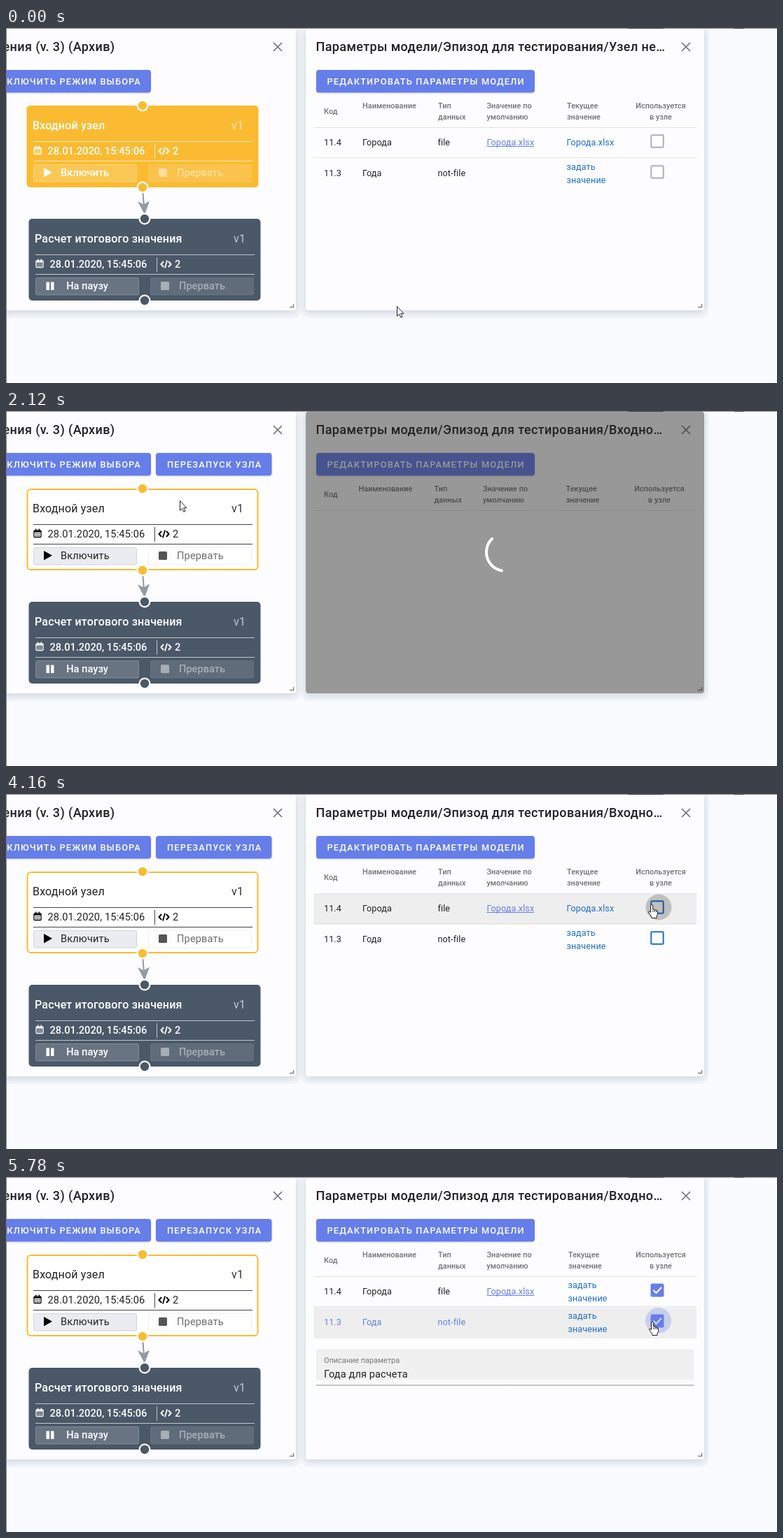
Animation, 1101 px wide and 508 px high, one loop 6.84 s. Source, as an HTML page with a canvas:

```html
<!DOCTYPE html>
<html lang="ru">
<head>
<meta charset="utf-8">
<title>Параметры модели</title>
<style>
html, body { margin: 0; width: 100%; height: 100%; overflow: hidden; background: #fafbfe; }
canvas { display: block; }
</style>
</head>
<body>
<canvas id="stage" width="1101" height="508"></canvas>
<script>
const ctx = document.getElementById('stage').getContext('2d');
const LOOP = 6840;
const ACCENT = '#667eea', LINK = '#1f6fc6', INK = '#222', YELLOW = '#fabb32', SLATE = '#4a5868', PANEL = '#fdfdff';

// The screen refreshes in bursts: [start, end, steps]
const BURSTS = [[620, 1200, 5], [1820, 2850, 8], [3000, 4030, 8], [4160, 5190, 8], [5480, 5780, 3]];
const STOPS = [0];
for (const [start, end, steps] of BURSTS)
  for (let i = 0; i < steps; i++)
    STOPS.push(Math.floor((start + (end - start) * i / (steps - 1)) / 10) * 10);

// Pointer: time, x, y, hand?
const POINTER = [
  [0, 558, 398], [620, 538, 376], [760, 462, 306], [900, 350, 210], [1050, 274, 146], [1200, 248, 128],
  [2500, 247, 128], [2800, 280, 143], [3000, 520, 172, 1], [3140, 749, 199, 1], [3280, 838, 190, 1],
  [3420, 886, 175, 1], [3580, 908, 165, 1], [3720, 914, 161, 1], [3860, 916, 159, 1], [4020, 917, 158, 1],
  [4590, 921, 182, 1], [4740, 920, 206, 1], [4880, 926, 208], [5180, 918, 207, 1]
];

function bezier(x1, y1, x2, y2) {
  const at = (a, b, s) => 3 * (1 - s) ** 2 * s * a + 3 * (1 - s) * s * s * b + s ** 3;
  return x => {
    if (x <= 0) return 0;
    if (x >= 1) return 1;
    let lo = 0, hi = 1;
    for (let i = 0; i < 24; i++) {
      const mid = (lo + hi) / 2;
      if (at(x1, x2, mid) < x) lo = mid; else hi = mid;
    }
    return at(y1, y2, lo);
  };
}
const fade = bezier(.25, .8, .5, 1), easeInOut = bezier(.42, 0, .58, 1);

function text(s, x, y, size, color, { weight = 400, spacing = 0, align = 'left' } = {}) {
  ctx.font = `${weight} ${size}px Roboto, sans-serif`;
  ctx.letterSpacing = spacing + 'px';
  ctx.textAlign = align;
  ctx.fillStyle = color;
  ctx.fillText(s, x, y);
}

function box(x, y, w, h, r, fill, stroke, width = 1) {
  ctx.beginPath();
  ctx.roundRect(x, y, w, h, r);
  if (fill) { ctx.fillStyle = fill; ctx.fill(); }
  if (stroke) { ctx.strokeStyle = stroke; ctx.lineWidth = width; ctx.stroke(); }
}

function path(points, { fill, stroke, width = 1, close = false }) {
  ctx.beginPath();
  points.forEach(([x, y]) => ctx.lineTo(x, y));
  if (close) ctx.closePath();
  if (fill) { ctx.fillStyle = fill; ctx.fill(); }
  if (stroke) { ctx.strokeStyle = stroke; ctx.lineWidth = width; ctx.stroke(); }
}
const line = (x1, y1, x2, y2, stroke, width = 1) => path([[x1, y1], [x2, y2]], { stroke, width });

function disc(x, y, r, fill) {
  ctx.beginPath();
  ctx.arc(x, y, r, 0, 7);
  ctx.fillStyle = fill;
  ctx.fill();
}

function panel(x, w) {
  ctx.save();
  ctx.shadowColor = 'rgba(110, 128, 155, .32)';
  ctx.shadowBlur = 11;
  ctx.shadowOffsetY = 2;
  box(x, 1, w, 403, 4, PANEL);
  ctx.restore();
  const right = x + w;
  path([[right - 3.5, 395], [right - 3.5, 399.5], [right - 9, 399.5]], { stroke: '#858585', width: 1.5 });
  const cx = right - 26, cy = 27;
  line(cx - 6, cy - 6, cx + 6, cy + 6, '#757575', 1.7);
  line(cx + 6, cy - 6, cx - 6, cy + 6, '#757575', 1.7);
}

function button(x, w, label, labelX, align) {
  ctx.save();
  ctx.shadowColor = 'rgba(0, 0, 0, .16)';
  ctx.shadowBlur = 3;
  ctx.shadowOffsetY = 1;
  box(x, 60, w, 32.5, 4, ACCENT);
  ctx.restore();
  text(label, labelX, 81, 12.8, '#fff', { weight: 500, spacing: 1.15, align });
}

function calendar(x, y, color) {
  box(x + 1, y + 2, 10, 9.5, 1, null, color, 1.3);
  ctx.fillStyle = color;
  ctx.fillRect(x + 1, y + 3, 10, 1.6);
  ctx.fillRect(x + 3, y - .5, 1.4, 3);
  ctx.fillRect(x + 7.6, y - .5, 1.4, 3);
  for (let i = 0; i < 6; i++) ctx.fillRect(x + 3 + i % 3 * 2.4, y + 6 + (i > 2) * 2.5, 1.3, 1.3);
}

function codeIcon(x, y, color) {
  const style = { stroke: color, width: 2 };
  path([[x + 4.5, y - 4], [x + 1, y], [x + 4.5, y + 4]], style);
  path([[x + 11.5, y - 4], [x + 15, y], [x + 11.5, y + 4]], style);
  line(x + 9.6, y - 5.5, x + 6.4, y + 5.5, color, 1.8);
}

function node(dx, dy, { title, action, paused, base, selected }) {
  const ink = selected ? '#222' : '#fff', icon = selected ? '#000' : '#fff';
  const weight = selected ? 400 : 500, spacing = selected ? .14 : 0;
  const rule = selected ? '#444' : 'rgba(255, 255, 255, .65)';
  const weak = selected ? '#6d6d6d' : 'rgba(255, 255, 255, .45)';
  ctx.save();
  ctx.translate(dx, dy);
  if (selected) box(30.5, 112, 329, 115, 5, '#fff', YELLOW, 2);
  else box(29.5, 111, 331, 117, 5, base);
  text(title, 38, 145, 16, ink, { weight, spacing: .16 });
  text('v1', 322, 145, 16, selected ? '#333' : 'rgba(255, 255, 255, .68)', { spacing: .15 });
  line(39, 162.5, 352, 162.5, rule);
  line(39, 190.5, 352, 190.5, rule);
  line(212.5, 166, 212.5, 187, rule);
  calendar(39, 169, icon);
  text('28.01.2020, 15:45:06', 59.5, 181, 14.6, ink, { weight, spacing });
  codeIcon(217.5, 176, icon);
  text('2', 238, 181, 14.6, ink, { weight });
  box(39.5, 195.5, 147, 24.5, 2, selected ? '#ebecf1' : 'rgba(255, 255, 255, .17)', selected ? '#d2d3da' : 'rgba(255, 255, 255, .25)');
  box(203.5, 195.5, 147, 24.5, 2, selected ? '#fefefe' : 'rgba(255, 255, 255, .12)', selected ? '#f0f0f2' : 'rgba(255, 255, 255, .1)');
  ctx.fillStyle = icon;
  if (paused) {
    ctx.fillRect(54.5, 201.5, 4.5, 11.5);
    ctx.fillRect(61, 201.5, 4.5, 11.5);
  } else path([[54, 200], [66, 206.7], [54, 213.4]], { fill: icon, close: true });
  text(action, paused ? 83.2 : 78, 212.3, 14.6, ink, { weight, spacing });
  box(218, 201, 12, 12, 1.5, selected ? '#555' : weak);
  text('Прервать', 244, 212.3, 14.6, weak, { weight, spacing });
  ctx.restore();
}

function port(x, y, color) {
  disc(x, y, 8.5, '#fff');
  disc(x, y, 6.2, color);
}

function checkbox(y, on, color) {
  if (!on) return box(921.3, y - 8.7, 17.4, 17.4, 1.5, null, color, 2);
  box(920.5, y - 9.5, 19, 19, 2.5, ACCENT);
  path([[924.5, y], [928.5, y + 4], [936, y - 4]], { stroke: '#fff', width: 2.2 });
}

function tableHead(loading, valueX) {
  const style = { weight: 500 }, shift = loading ? -5.5 : 0;
  const cell = (lines, x, y, opts = style) => lines.forEach((s, i) => text(s, x, y + i * 16.4, 10.9, '#727272', opts));
  cell(['Код'], 454, 123);
  cell(['Наименование'], 509 + shift, 115);
  cell(['Тип', 'данных'], 617 + shift, 115);
  cell(['Значение по', 'умолчанию'], 686.5 + shift, 115);
  cell(['Текущее', 'значение'], valueX, 115);
  cell(['Используется', 'в узле'], loading ? 933 : 935, 115, { weight: 500, align: 'center' });
  line(440, 142.5, 986, 142.5, '#e2e2e4');
}

function row(y, { code, name, type, file, value, valueX, hover, selected, checked, boxColor }) {
  if (hover || selected) {
    ctx.fillStyle = hover ? '#eeeeee' : '#eef0fc';
    ctx.fillRect(439.5, y - 21, 546.5, 44.5);
  }
  const color = selected ? ACCENT : INK, base = y + 4.5;
  const cell = (s, x, dy, ink) => text(s, x, base + dy, 12.6, ink, { spacing: .1 });
  cell(code, 454, 0, color);
  cell(name, 509, 0, color);
  cell(type, 616.5, 0, color);
  if (file) {
    cell(file, 686.5, 0, ACCENT);
    line(686.5, base + 1.5, 686.5 + ctx.measureText(file).width, base + 1.5, ACCENT);
  }
  if (value) cell(value, valueX - .5, 0, LINK);
  else {
    cell('задать', valueX - .5, -9.3, LINK);
    cell('значение', valueX - .5, 9.8, LINK);
  }
  checkbox(y - 1.5, checked, boxColor);
}

function description(value, bottom) {
  box(443, 246, 539.5, 52, [4, 4, 0, 0], '#fafafb');
  box(443, 246, 539.5, bottom - 246, [4, 4, 0, 0], '#f0f0f0');
  line(443, 298, 982.5, 298, '#8c8c8c');
  text('Описание параметра', 454, 266, 10.9, '#777');
  text(value, 454, 286.6, 14.5, INK, { spacing: .15 });
}

function spinner(elapsed) {
  const phase = elapsed / 1400 % 1;
  const grow = easeInOut(phase * 2), slide = easeInOut(phase * 2 - 1);
  const from = 15 * grow + 110 * slide;
  const to = Math.min(from + 1 + 99 * grow, 125.6);
  const turn = phase * Math.PI * 2;
  ctx.beginPath();
  ctx.arc(713, 202, 27, turn + from / 20, turn + to / 20);
  ctx.strokeStyle = '#fff';
  ctx.lineWidth = 4;
  ctx.lineCap = 'round';
  ctx.stroke();
  ctx.lineCap = 'butt';
}

function overlay(t, on, off) {
  if (t < on || t > off + 300) return;
  const alpha = .46 * fade((t - on) / 300) * (1 - fade((t - off) / 300));
  box(428, 1, 569, 403, 4, `rgba(33, 33, 33, ${alpha})`);
  if (t < off) spinner(t - on);
}

function pointer(x, y, hand) {
  ctx.save();
  ctx.translate(x, y);
  ctx.lineJoin = 'round';
  const style = { fill: '#fff', stroke: '#222', width: 1, close: true };
  if (hand) {
    path([[3.5, 2], [4.5, .6], [6, .6], [6.7, 2], [6.7, 7], [9, 7], [9.6, 8], [11.5, 8], [12, 9], [13.5, 9.6],
      [13.5, 14], [12, 17], [12, 19.5], [5, 19.5], [4.5, 17], [.8, 12], [.8, 10.3], [2, 10], [3.5, 11.5]], style);
    for (const fx of [6.8, 9.2, 11.5]) line(fx, 8, fx, 11, '#111', .8);
  } else {
    path([[.5, .5], [.5, 14.3], [3.6, 11.4], [5.8, 16.3], [8, 15.3], [5.8, 10.6], [10, 10.6]], style);
  }
  ctx.restore();
}

function heading(s, x, align) {
  text(s, x, 33, 18, INK, { weight: 500, spacing: .37, align });
}

function diagram(selected) {
  panel(-20, 434);
  heading('ения (v. 3) (Архив)', 155.5, 'right');
  button(-60, 267, 'КЛЮЧИТЬ РЕЖИМ ВЫБОРА', 193, 'right');
  if (selected) button(214, 165.5, 'ПЕРЕЗАПУСК УЗЛА', 230);
  node(0, 0, { title: 'Входной узел', action: 'Включить', base: YELLOW, selected });
  node(3, 162, { title: 'Расчет итогового значения', action: 'На паузу', paused: true, base: SLATE });
  line(195.5, 236, 197, 256, '#929aa5', 2);
  path([[188, 248], [196.5, 252.5], [205, 247.5], [198, 267]], { fill: '#929aa5', close: true });
  port(195, 111, YELLOW);
  port(195, 228, YELLOW);
  port(198, 273, SLATE);
  port(198, 390, SLATE);
}

function parameters(t, px, py) {
  const selected = t >= 1820, loading = selected && t < 2500;
  const firstOn = t >= 4300, secondOn = t >= 5600, cleared = t >= 5030;
  const active = secondOn ? 2 : firstOn ? 1 : 0;
  const covered = t >= 4797 && t < 5180;
  const hovered = t < 3000 || covered || px < 440 ? 0 : py < 184 ? 1 : 2;
  const valueX = loading ? 799.5 : cleared ? 803 : 801;
  panel(428, 569);
  heading('Параметры модели/Эпизод для тестирования/' + (selected ? 'Входно…' : 'Узел не…'), 442.5);
  button(443, 312, 'РЕДАКТИРОВАТЬ ПАРАМЕТРЫ МОДЕЛИ', 458.5);
  tableHead(loading, valueX);
  if (!loading) {
    const boxColor = selected ? LINK : '#b0b0b3';
    row(163.5, { code: '11.4', name: 'Города', type: 'file', file: 'Города.xlsx', value: cleared ? '' : 'Города.xlsx',
      valueX, hover: hovered === 1, selected: active === 1, checked: firstOn, boxColor });
    row(207.5, { code: '11.3', name: 'Года', type: 'not-file',
      valueX, hover: hovered === 2, selected: active === 2, checked: secondOn, boxColor });
    line(440, 185.5, 986, 185.5, '#e2e2e4');
  }
  if (active) description(active === 1 ? 'Список для расчета' : 'Года для расчета', t >= 5180 ? 290 : 298);
  const grey = 'rgba(0, 0, 0, .2)', blue = 'rgba(102, 126, 234, .28)';
  if (t >= 4160 && t < 4450) disc(932, 162, 18.5, firstOn ? blue : grey);
  if (t >= 5480) disc(931.5, 205.5, 18.5, secondOn ? blue : grey);
  overlay(t, 1789, 2490);
  overlay(t, 4797, 4960);
}

function backdrop() {
  ctx.fillStyle = '#fafbfe';
  ctx.fillRect(0, 0, 1101, 508);
  const halo = '#f3f5f9';
  box(-20, -20, 441, 435, 12, halo);
  box(421, -20, 582, 435, 12, halo);
}

function screenEdge() {
  ctx.fillStyle = '#858589';
  ctx.fillRect(0, 0, 1101, 1);
  ctx.fillRect(0, 0, 1, 508);
  ctx.fillStyle = '#3c3c40';
  ctx.fillRect(888, 0, 51, 1);
  ctx.fillRect(1040, 0, 14, 1);
}

function draw(time) {
  const t = STOPS.findLast(stop => stop <= time);
  const [, px, py, hand] = POINTER.findLast(key => key[0] <= t);
  backdrop();
  diagram(t >= 1820);
  parameters(t, px, py);
  screenEdge();
  pointer(px, py, hand);
}

const started = performance.now();
function tick() {
  draw((performance.now() - started) % LOOP);
  requestAnimationFrame(tick);
}
tick();
</script>
</body>
</html>
```
